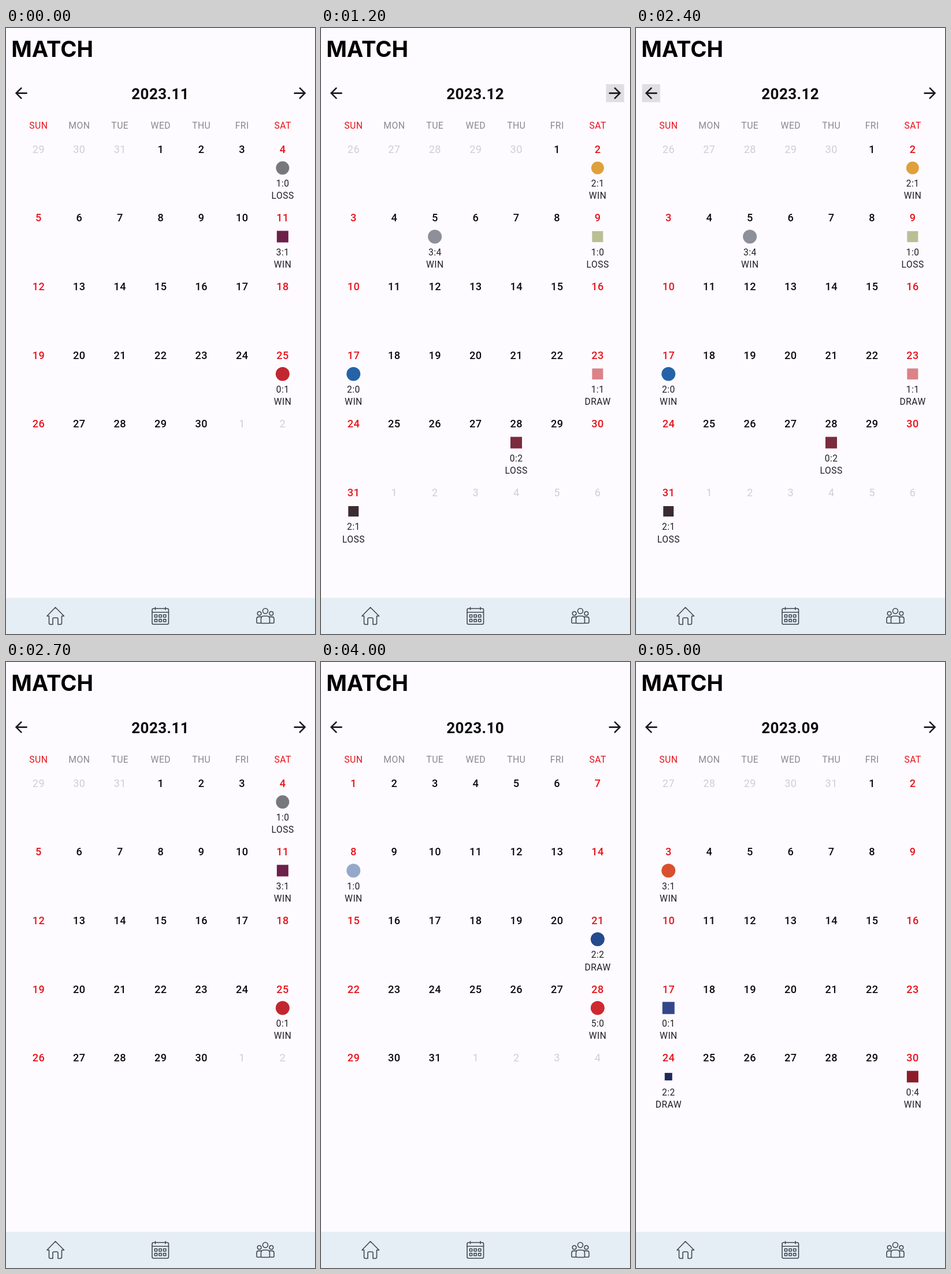
These frames come from a looping animation (535 px wide and 1047 px high, 5800 ms). An HTML page:

```html
<!DOCTYPE html>
<html lang="en">
<head>
<meta charset="utf-8">
<title>Match calendar</title>
<style>
  html, body { margin: 0; width: 100%; height: 100%; overflow: hidden; background: #fdfbff; }
  svg { display: block; width: 100%; height: 100%; }
  text { font-family: Roboto, sans-serif; text-anchor: middle; letter-spacing: .4px; }
  .title { font: 700 38.2px Inter, sans-serif; text-anchor: start; letter-spacing: 0; fill: #000; }
  .month { font-size: 26px; font-weight: 700; fill: #0b0a0c; }
  .week { font-size: 15.8px; fill: #8a898d; }
  .day { font-size: 18.2px; font-weight: 500; fill: #0b0a0c; }
  .result { font-size: 15.6px; letter-spacing: .5px; fill: #1f1e22; }
  .week.red, .day.red { fill: #e6141c; }
  .day.out { font-weight: 400; fill: #d0ced3; }
  .arrow { fill: #1c1b1f; }
  .icon { fill: none; stroke: #3f4852; stroke-width: 1.6; stroke-linejoin: round; stroke-linecap: round; }
</style>
</head>
<body>
<svg id="stage" viewBox="0 0 535 1047">
  <rect width="535" height="1047" fill="#fdfbff"/>
  <text class="title" x="9.2" y="50">MATCH</text>
  <rect id="prev" x="10.5" y="97" width="31.4" height="31.2" fill="#e0dee3" opacity="0"/>
  <rect id="next" x="493.4" y="97" width="31.4" height="31.2" fill="#e0dee3" opacity="0"/>
  <path class="arrow" transform="translate(10.6 97) scale(1.3)" d="M20 11H7.83l5.59-5.59L12 4l-8 8 8 8 1.41-1.41L7.83 13H20z"/>
  <path class="arrow" transform="translate(493.4 97) scale(1.3)" d="M12 4l-1.41 1.41L16.17 11H4v2h12.17l-5.58 5.59L12 20l8-8z"/>
  <text id="label" class="month" x="267.2" y="123"></text>
  <g id="grid"></g>
  <rect y="984.5" width="535" height="62.5" fill="#e5edf5"/>
  <path class="icon" d="M71 1016L85.5 1001L100.5 1016H96.5V1028q0 2.5-2.5 2.5H90V1021q0-2-2-2h-5q-2 0-2 2V1030.5H77q-2.5 0-2.5-2.5V1016Z"/>
  <g id="calendar" class="icon">
    <rect x="253" y="1003" width="28.5" height="27.3" rx="2.5"/>
    <path d="M253 1009.5H281.5M258.5 1001V1005M276 1001V1005"/>
  </g>
  <g class="icon">
    <circle cx="449" cy="1007.3" r="4.5"/>
    <circle cx="438.6" cy="1011.5" r="3.3"/>
    <circle cx="459.4" cy="1011.5" r="3.3"/>
    <path d="M441.5 1027V1021q0-5 5-5h5q5 0 5 5v6q0 1.5-1.5 1.5h-12q-1.5 0-1.5-1.5Z"/>
    <path d="M441.5 1028.3H435.5q-1.5 0-1.5-1.5V1021q0-3.6 3.6-3.6H442M456.5 1028.3H462.5q1.5 0 1.5-1.5V1021q0-3.6-3.6-3.6H456"/>
  </g>
</svg>
<script>
const NS = "http://www.w3.org/2000/svg";
const $ = id => document.getElementById(id);
const colX = c => 56.2 + 70.45 * c;
const rowY = r => 215.8 + 118.65 * r;

function add(parent, tag, attrs, text) {
  const el = document.createElementNS(NS, tag);
  for (const k in attrs) el.setAttribute(k, attrs[k]);
  if (text !== undefined) el.textContent = text;
  return parent.appendChild(el);
}

// first weekday, length of the month before, length, games: day -> [score, result, shape, size, colour]
const months = {
  "2023.09": { first: 5, before: 31, days: 30, games: {
    3: ["3:1", "WIN", "circle", 24, "#d9502f"],
    17: ["0:1", "WIN", "square", 21, "#34478a"],
    24: ["2:2", "DRAW", "square", 13, "#1d2a56"],
    30: ["0:4", "WIN", "square", 20, "#8b1d2a"] } },
  "2023.10": { first: 0, before: 30, days: 31, games: {
    8: ["1:0", "WIN", "circle", 24, "#94a9c9"],
    21: ["2:2", "DRAW", "circle", 24, "#24498c"],
    28: ["5:0", "WIN", "circle", 24, "#cf2830"] } },
  "2023.11": { first: 3, before: 31, days: 30, games: {
    4: ["1:0", "LOSS", "circle", 23, "#77787a"],
    11: ["3:1", "WIN", "square", 20, "#6d2049"],
    25: ["0:1", "WIN", "circle", 24, "#c1272f"] } },
  "2023.12": { first: 5, before: 30, days: 31, games: {
    2: ["2:1", "WIN", "circle", 22, "#dfa03c"],
    5: ["3:4", "WIN", "circle", 24, "#8d909b"],
    9: ["1:0", "LOSS", "square", 19, "#b9c094"],
    17: ["2:0", "WIN", "circle", 24, "#2563a8"],
    23: ["1:1", "DRAW", "square", 19, "#dc8288"],
    28: ["0:2", "LOSS", "square", 20, "#7b2b3c"],
    31: ["2:1", "LOSS", "square", 18, "#3a2c30"] } }
};

function addGame(g, x, y, [score, result, shape, size, fill]) {
  const cy = y + 26;
  if (shape === "circle") add(g, "circle", { cx: x, cy, r: size / 2, fill });
  else add(g, "rect", { x: x - size / 2, y: cy - size / 2, width: size, height: size, fill });
  add(g, "text", { class: "result", x: x + .2, y: y + 58.3 }, score);
  add(g, "text", { class: "result", x: x + .2, y: y + 79.6 }, result);
}

function buildMonth({ first, before, days, games }) {
  const g = add($("grid"), "g", { visibility: "hidden" });
  const cells = Math.ceil((first + days) / 7) * 7;
  for (let i = 0; i < cells; i++) {
    const n = i - first + 1, c = i % 7, x = colX(c), y = rowY(Math.floor(i / 7));
    const out = n < 1 || n > days;
    const kind = out ? "out" : c % 6 === 0 ? "red" : "";
    const shown = n < 1 ? n + before : n > days ? n - days : n;
    add(g, "text", { class: "day " + kind, x: x + .2, y }, shown);
    if (!out && games[n]) addGame(g, x, y, games[n]);
  }
  return g;
}

["SUN", "MON", "TUE", "WED", "THU", "FRI", "SAT"].forEach((name, c) =>
  add($("stage"), "text", { class: "week" + (c % 6 ? "" : " red"), x: colX(c) + .2, y: 174.2 }, name));

for (let i = 0; i < 6; i++)
  add($("calendar"), "rect", { x: 257.3 + 7.6 * (i % 3), y: 1013.8 + 7.8 * Math.floor(i / 3), width: 4.4, height: 4.2, rx: .6 });

const grids = {};
for (const name in months) grids[name] = buildMonth(months[name]);

const LOOP = 5800;
const labelSteps = [[0, "2023.11"], [1100, "2023.12"], [2500, "2023.11"], [3400, "2023.10"], [4500, "2023.09"]];
const gridSteps = [[0, "2023.11"], [1200, "2023.12"], [2600, "2023.11"], [3500, "2023.10"], [4600, "2023.09"]];
const presses = [[900, "next"], [2200, "prev"], [3200, "prev"], [4200, "prev"]];
const glow = [.5, 1, 1, 1, .5];

const at = (steps, t) => steps.filter(s => s[0] <= t).pop()[1];

function draw(t) {
  $("label").textContent = at(labelSteps, t);
  const current = at(gridSteps, t);
  for (const name in grids) grids[name].setAttribute("visibility", name === current ? "visible" : "hidden");
  const light = { prev: 0, next: 0 };
  for (const [start, id] of presses) light[id] += glow[Math.floor((t - start) / 100)] || 0;
  for (const id in light) $(id).setAttribute("opacity", light[id]);
}

const begin = performance.now();
function tick(now) {
  draw(Math.max(0, now - begin) % LOOP);
  requestAnimationFrame(tick);
}
draw(0);
requestAnimationFrame(tick);
</script>
</body>
</html>
```
